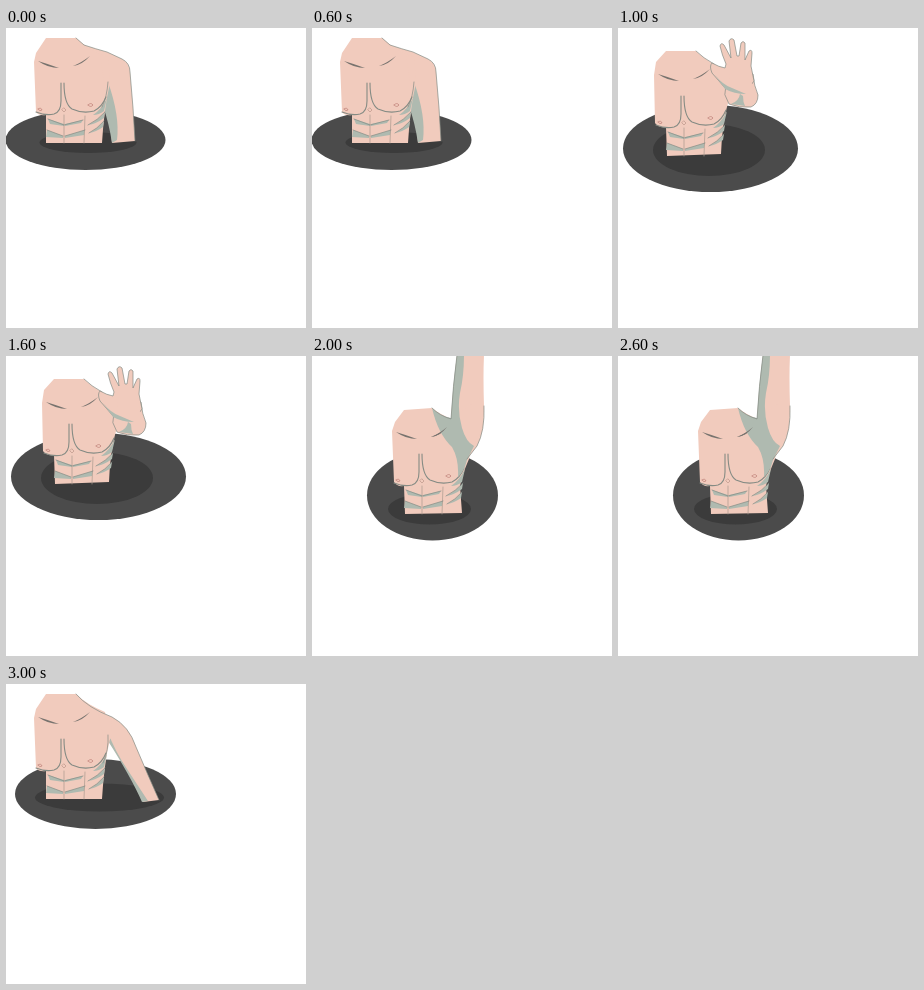
Animation, 300 px wide and 300 px high, one loop 4 s. Source, as an HTML page with a canvas:

```html
<!DOCTYPE html>
<html lang="en">
<head>
<meta charset="utf-8">
<title>Torso in a hole</title>
<style>
  html, body { margin: 0; width: 100%; height: 100%; overflow: hidden; background: #fff; }
  canvas { display: block; }
</style>
</head>
<body>
<canvas id="stage" width="300" height="300"></canvas>
<script>
const ctx = document.getElementById('stage').getContext('2d');
const SKIN = '#f1cbbd', SHADE = '#afbab0', LINE = '#858b84', RIM = '#4b4b4b', HOLE = '#3b3b3b';
const STEP = 1000;

function fill(d, color) {
  ctx.fillStyle = color;
  ctx.fill(new Path2D(d));
}

function stroke(d, color = LINE, width = 0.7) {
  ctx.strokeStyle = color;
  ctx.lineWidth = width;
  ctx.stroke(new Path2D(d));
}

function oval(x, y, rx, ry, color) {
  ctx.fillStyle = color;
  ctx.beginPath();
  ctx.ellipse(x, y, rx, ry, 0, 0, Math.PI * 2);
  ctx.fill();
}

// Parts shared by every pose, relative to the torso origin
function muscles() {
  // abdomen shading
  fill('M42 91 L58 96 L58 98 L44 96 Z', SHADE);
  fill('M59 96 L77 92 L75 95 L59 98 Z', SHADE);
  fill('M41 102 L57 108 L57 110 L40 109 Z', SHADE);
  fill('M59 108 L79 102 L78 107 L59 110 Z', SHADE);
  // ribs and flank
  fill('M87 87 Q95 82 101 70 L98 83 Q93 87 87 87 Z', SHADE);
  fill('M82 97 Q92 92 99 84 L98 90 Q90 96 82 97 Z', SHADE);
  fill('M83 105 Q91 101 98 93 L97 99 Q90 104 83 105 Z', SHADE);
  // pectorals
  stroke('M30 84 Q40 88 48 86 Q55 84 55 73 L55 55', LINE, 1.1);
  stroke('M58 55 Q58 76 66 81 Q77 86 88 83 Q96 79 100 69', LINE, 1.1);
  stroke('M58 80 L60 82 L58 84 L56 82 Z', '#b48d82', 0.6);
  // collarbones
  fill('M32 33 Q42 36 53 40 Q42 40 32 33 Z', '#77736e');
  fill('M67 38 Q75 35 84 28 Q76 37 67 38 Z', '#77736e');
  // abdomen lines
  stroke('M58 87 L58 115 M79 88 L78 115', '#a99a8e', 0.7);
  stroke('M42 91 L58 97 L77 92 M41 102 L57 108 M59 108 L79 102');
  stroke('M82 97 Q92 92 99 84 M83 105 Q91 101 98 93');
  stroke('M32 81 q3 -2 4 1 q-2 2 -4 -1 M82 77 q3 -3 5 0 q-2 3 -5 0', '#bd7f76', 0.7);
}

function torso(x, y, outline) {
  fill(outline, SKIN);
  ctx.save();
  ctx.translate(x, y);
  muscles();
  ctx.restore();
}

function rim(x, y, rx, ry, ix, iy, irx, iry) {
  oval(x, y, rx, ry, RIM);
  oval(ix, iy, irx, iry, HOLE);
}

const BASE = 'M40 10 L70 10 Q80 20 99 28 L104 55 Q98 80 96 115 L40 115 L40 87 Q33 88 30 84 L28 34 L30 25 Z';

function armDown() {
  const arm = 'M70 10 L78 17 Q90 21 101 24 L116 31 Q124 35 124 44 L127 80 L129 113';
  rim(79.5, 112, 80, 30, 82, 114.5, 48.5, 10.5);
  fill(arm + ' L106 115 Q105 94 98 80 L97 45 Z', SKIN);
  fill('M102 54 Q100 70 97 78 Q103 95 106 115 L111 112 Q114 88 102 54 Z', SHADE);
  torso(0, 0, BASE);
  fill('M94 26 L102 29 L104 54 L99 60 Z', SKIN);
  stroke(arm);
  stroke('M102 54 Q101 69 96 79');
}

function wave() {
  const shoulder = 'M78 23 Q85 30 96 36';
  rim(92.5, 120.5, 87.5, 43.5, 91, 122, 56, 26);
  torso(8, 13, 'M48 23 L78 23 Q85 30 96 36 L110 45 L111 71 Q104 95 103 126 L49 128 L48 99 Q40 100 37 95 L36 47 L38 34 Z');
  stroke(shoulder);
  // forearm and open hand
  const forearm = 'M110 44 L135 46 Q136 58 140 67 Q140 76 133 79 Q121 80 111 76 L107 67 Z';
  const hand = 'M107 60 Q101 53 94 45 Q91 38 94 35 Q101 39 107 40 L108 36 Q104 27 102 18 Q103 14 106 17 L113 30 L111 13 Q113 9 116 12 L119 28 L121 28 L123 15 Q125 12 127 15 L127 32 L131 23 Q134 21 134 25 L133 38 L136 53 Q129 65 117 62 Z';
  fill(forearm, SKIN);
  stroke(forearm);
  fill(hand, SKIN);
  stroke(hand);
  fill('M112 44 L132 44 L135 62 L122 69 L111 66 Z', SKIN);
  fill('M97 47 Q105 57 114 60 L128 66 Q116 66 107 61 Z', SHADE);
  fill('M122 66 L125 68 Q125 74 127 78 L113 76 Q121 73 122 66 Z', SHADE);
}

function armUp() {
  rim(120.5, 139.5, 65.5, 45, 117.5, 153, 41.5, 15.5);
  fill('M145 -1 L172 -1 Q171 20 172 50 Q173 75 165 90 L155 103 L130 70 L139 64 Q141 30 145 -1 Z', SKIN);
  torso(52, 43, 'M92 54 L120 52 Q129 59 140 63 L160 84 L157 103 Q150 119 148 130 L150 157 L93 158 L92 130 Q85 131 82 126 L80 75 L83 66 Z');
  fill('M140 61 L171 40 L171 72 L159 93 L148 88 Z', SKIN);
  fill('M120 52 Q128 60 139 62 Q141 26 145 -1 L152 -1 Q152 20 148 37 Q145 55 150 72 Q154 86 162 90 L155 104 Q152 116 146 121 Q147 103 140 91 Q126 78 120 52 Z', SHADE);
  fill('M119 81 Q127 78 135 71 Q128 80 119 81 Z', '#77736e');
  stroke('M145 -1 Q141 30 139 63 Q128 60 120 52 M172 50 Q173 75 165 90 L155 103');
}

function armOut() {
  const arm = 'M70 10 Q82 24 106 33 Q123 42 130 63 L142 91 L153 116';
  rim(89.5, 110, 80.5, 35, 93.5, 113.5, 64.5, 14);
  fill(arm + ' L137 118 Q126 93 103 57 L96 45 Z', SKIN);
  fill('M102 48 Q108 66 123 88 L142 117 L136 118 Q125 93 102 57 Z', SHADE);
  torso(0, 0, BASE);
  fill('M92 27 L105 34 L106 53 L99 61 Z', SKIN);
  stroke(arm);
  stroke('M102 51 Q103 66 97 79');
}

const poses = [armDown, wave, armUp, armOut];
const start = performance.now();
ctx.lineJoin = ctx.lineCap = 'round';

function frame(now) {
  const t = Math.max(0, now - start);
  ctx.fillStyle = '#fff';
  ctx.fillRect(0, 0, 300, 300);
  poses[Math.floor(t / STEP) % poses.length]();
  requestAnimationFrame(frame);
}
frame(start);
</script>
</body>
</html>
```
